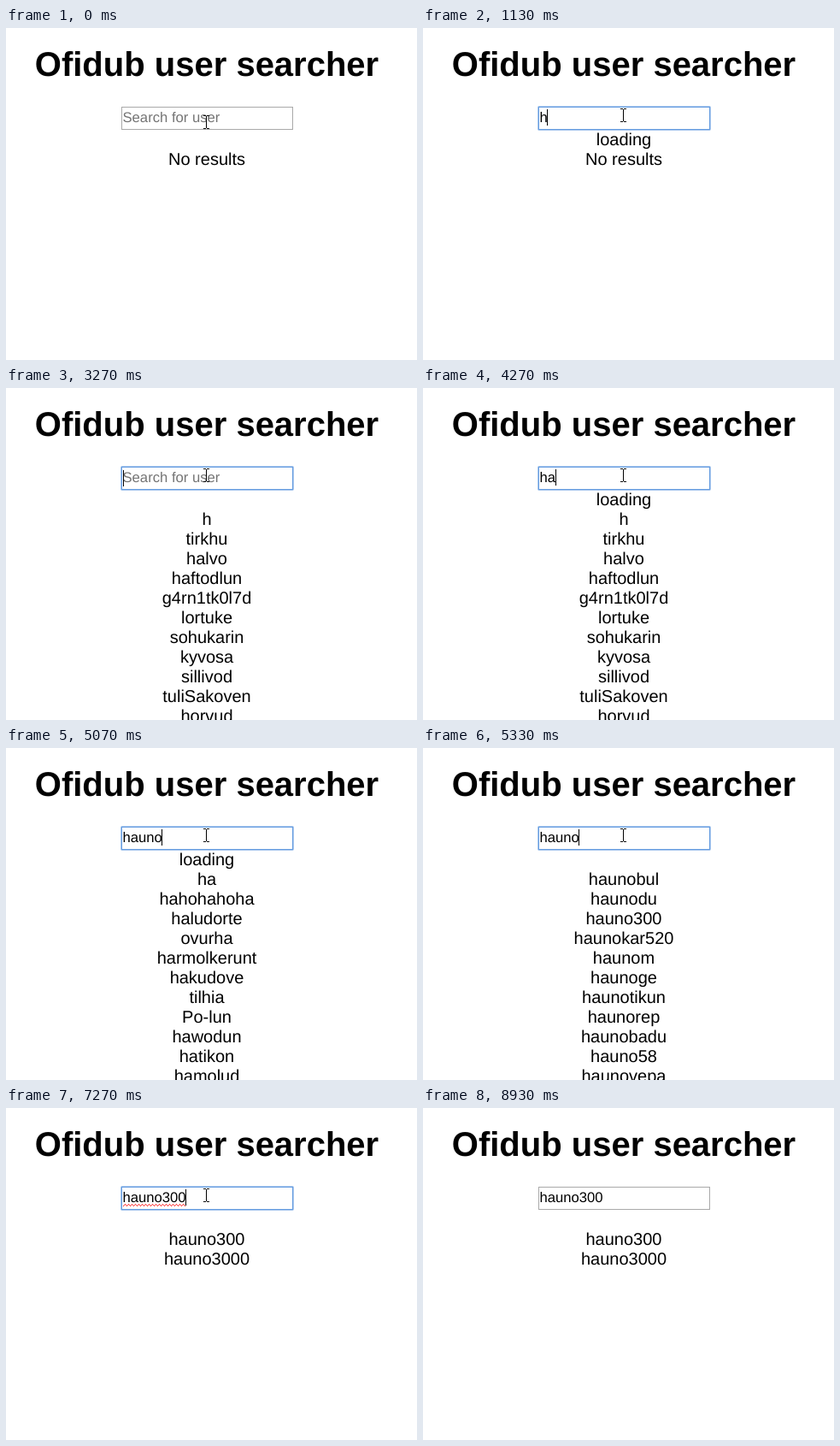
Animation, 481 px wide and 388 px high, one loop 8990 ms. Source, as an HTML page:

```html
<!DOCTYPE html>
<html lang="en">
<head>
<meta charset="utf-8">
<title>User searcher</title>
<style>
  html, body { margin: 0; width: 100%; height: 100%; overflow: hidden; background: #fff; }
  svg { display: block; }
  text {
    font: 20px "Liberation Sans", Arial, sans-serif;
    text-rendering: geometricPrecision;
    white-space: pre;
  }
  .mid { text-anchor: middle; }
  .title { font-size: 40px; font-weight: bold; }
  .field { font-size: 16.667px; }
  .hint { fill: #757575; }
  .off { display: none; }
</style>
</head>
<body>
<svg width="481" height="388" viewBox="0 0 481 388">
  <defs>
    <pattern id="wave" x="137" y="112" width="4" height="3" patternUnits="userSpaceOnUse">
      <path d="M0 2h1v1h-1zM1 1h1v1h-1zM2 0h1v1h-1zM3 1h1v1h-1z" fill="#f00" fill-opacity=".85"/>
    </pattern>
  </defs>

  <text class="mid title" x="235" y="56">Ofidub user searcher</text>

  <rect id="border" x="135.5" y="92.5" width="200" height="26" fill="#fff" stroke="#a9a9a9"/>
  <g id="ring" class="off" fill="none" stroke="#659ce0">
    <rect x="134.5" y="91.5" width="202" height="28" rx="1" stroke-opacity=".55"/>
    <rect x="135.5" y="92.5" width="200" height="26"/>
  </g>
  <rect id="squiggle" class="off" x="137" y="112" width="74" height="3" fill="url(#wave)"/>
  <text id="hint" class="field hint" x="136.5" y="110">Search for user</text>
  <text id="typed" class="field" x="136.5" y="110"></text>
  <rect id="caret" class="off" width="1" height="19"/>

  <text id="loading" class="mid off" x="235" y="137">loading</text>
  <g id="rows"></g>

  <path id="beam" d="M0 0h3v1h-3zM4 0h3v1h-3zM3 1h1v14h-1zM0 15h3v1h-3zM4 15h3v1h-3z"/>
  <path id="arrow" class="off" d="M.5 .5V16.5L4.2 13L6.7 18.5L9 17.5L6.6 12.2H11.7Z" fill="#fff" stroke="#000"/>
</svg>

<script>
const LOOP = 8990;
const LINE = 23;
const CHAR = 16.667 * 0.5562;   // every typed character has this advance

const words = s => s.split(' ');
const lists = {
  none: ['No results'],
  h: words('h tirkhu halvo haftodlun g4rn1tk0l7d lortuke sohukarin kyvosa sillivod tuliSakoven horvud'),
  ha: words('ha hahohahoha haludorte ovurha harmolkerunt hakudove tilhia Po-lun hawodun hatikon hamolud'),
  hau: words('hau haudersonvan haukode hauvil hautobe hau-pek haudolin haubera haugot haukumo hauped'),
  haun: words('haun haunde haunivo haunkel haunoped haunrad haunyk haunebo haunita haunulo haunkor'),
  hauno: words('haunobul haunodu hauno300 haunokar520 haunom haunoge haunotikun haunorep haunobadu hauno58 haunovepa'),
  hauno3: words('hauno3 hauno300 hauno31 hauno3000 hauno37 hauno34 hauno386 hauno39 hauno32 hauno365 hauno33'),
  end: words('hauno300 hauno3000')
};

const type = typed => ({ typed, caret: true, loading: true });
const load = list => ({ list, loading: false });
const blink = caret => ({ caret });
const beam = y => ({ pointer: ['beam', 231, y] });
const arrow = (x, y) => ({ pointer: ['arrow', x, y] });

const start = {
  typed: '', list: 'none', loading: false,
  focus: false, caret: false, squiggle: false, ...beam(102)
};

// Each step changes part of the state at its time in ms.
const steps = [
  [130, beam(96)],
  [330, { focus: true, caret: true }],
  [400, beam(94)],
  [870, blink(false)],
  [1130, type('h')],
  [1470, load('h')],
  [1670, blink(false)],
  [2200, blink(true)],
  [2470, { typed: '' }],
  [2730, blink(false)],
  [3270, blink(true)],
  [3800, blink(false)],
  [4070, type('h')],
  [4200, load('h')],
  [4270, type('ha')],
  [4470, load('ha')],
  [4730, type('hau')],
  [4870, type('haun')],
  [5070, type('hauno')],
  [5130, load('hau')],
  [5270, load('haun')],
  [5330, load('hauno')],
  [5600, blink(false)],
  [5800, type('hauno3')],
  [6070, type('hauno30')],
  [6200, type('hauno300')],
  [6270, load('hauno3')],
  [6400, load('end')],
  [6730, blink(false)],
  [7270, { caret: true, squiggle: true }],
  [7800, blink(false)],
  [8070, arrow(224, 128)],
  [8130, arrow(188, 226)],
  [8200, arrow(135, 346)],
  [8270, { pointer: null }],
  [8330, blink(true)],
  [8870, blink(false)],
  [8930, { focus: false, squiggle: false }]
];

const $ = id => document.getElementById(id);
const show = (id, on) => $(id).classList.toggle('off', !on);

function drawList(names) {
  $('rows').replaceChildren(...names.map((name, i) => {
    const row = document.createElementNS('http://www.w3.org/2000/svg', 'text');
    row.setAttribute('class', 'mid');
    row.setAttribute('x', 235);
    row.setAttribute('y', 160 + i * LINE);
    row.textContent = name;
    return row;
  }));
}

function draw(s) {
  $('typed').textContent = s.typed;
  show('hint', !s.typed);
  show('border', !s.focus);
  show('ring', s.focus);
  show('squiggle', s.squiggle);
  show('loading', s.loading);
  show('caret', s.caret);
  $('caret').setAttribute('x', s.typed ? Math.floor(136.5 + s.typed.length * CHAR) : 137);
  $('caret').setAttribute('y', s.typed ? 95 : 96);
  drawList(lists[s.list]);

  const [kind, x, y] = s.pointer || [];
  for (const id of ['beam', 'arrow']) {
    show(id, id === kind);
    if (id === kind) $(id).setAttribute('transform', `translate(${x} ${y})`);
  }
}

const begin = performance.now();
let shown = -1;

function tick() {
  const t = (performance.now() - begin) % LOOP;
  const count = steps.filter(([at]) => at <= t).length;
  if (count !== shown) {
    shown = count;
    draw(Object.assign({}, start, ...steps.slice(0, count).map(step => step[1])));
  }
  requestAnimationFrame(tick);
}
tick();
</script>
</body>
</html>
```
